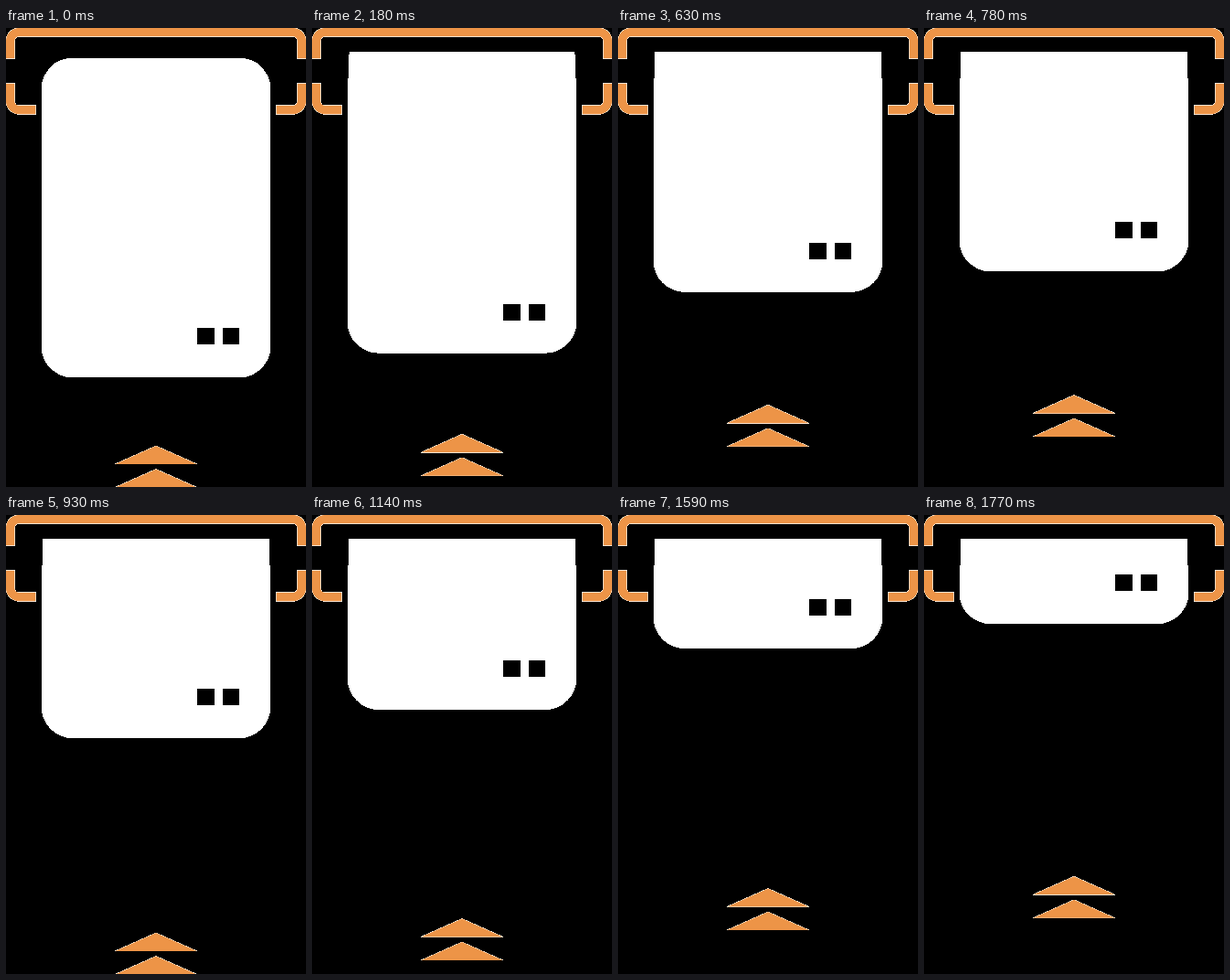
Write an HTML page with a canvas that moves like this. It is 328x502 px and loops after 1800 ms.

```html
<!DOCTYPE html>
<html lang="en">
<head>
<meta charset="utf-8">
<title>Card insert</title>
<style>
html, body { margin: 0; width: 100%; height: 100%; overflow: hidden; background: #000; }
canvas { display: block; }
</style>
</head>
<body>
<canvas id="stage" width="328" height="502"></canvas>
<script>
const ctx = document.getElementById('stage').getContext('2d', { willReadFrequently: true });
const W = 328, H = 502, LOOP = 1800, STEP = 30;
const ORANGE = '#ed9447';
const SLOT_Y = 26;

function drawSlot() {
  const c = 4.65, r = 9.5, top = 33.3, low = 60.7, end = 32.4, base = 89.5;
  ctx.beginPath();
  ctx.moveTo(c, top);
  ctx.arcTo(c, c, W / 2, c, r);
  ctx.arcTo(W - c, c, W - c, top, r);
  ctx.lineTo(W - c, top);
  for (const side of [x => x, x => W - x]) {
    ctx.moveTo(side(c), low);
    ctx.arcTo(side(c), base, side(end), base, r);
    ctx.lineTo(side(end), base);
  }
  ctx.strokeStyle = ORANGE;
  ctx.lineWidth = 9.4;
  ctx.stroke();
}

function drawCard(shift) {
  ctx.save();
  ctx.beginPath();
  ctx.rect(40, SLOT_Y, 248, 29);
  ctx.rect(0, 55, W, H - 55);
  ctx.clip();
  ctx.fillStyle = '#fff';
  ctx.beginPath();
  ctx.roundRect(39, 33 - shift, 250, 349, 34);
  ctx.fill();
  ctx.globalCompositeOperation = 'destination-out';
  ctx.fillRect(209, 328 - shift, 19, 18.8);
  ctx.fillRect(236.6, 328 - shift, 18.8, 18.8);
  ctx.restore();
}

function drawChevron(y) {
  ctx.beginPath();
  ctx.moveTo(164, y);
  ctx.lineTo(209, y + 20);
  ctx.lineTo(119, y + 20);
  ctx.fillStyle = ORANGE;
  ctx.fill();
}

// Soft edge pixels blend with white; everything empty becomes black.
function matte() {
  const img = ctx.getImageData(0, 0, W, H), d = img.data;
  for (let i = 0; i < d.length; i += 4) {
    const a = d[i + 3] / 255, solid = a > 0.08;
    for (let k = i; k < i + 3; k++) {
      d[k] = solid ? d[k] * a + 255 * (1 - a) : 0;
    }
    d[i + 3] = 255;
  }
  ctx.putImageData(img, 0, 0);
}

// Two upward runs per loop, with a jump back between them.
function chevronTop(t) {
  const run = t < 930 ? t / 900 : (t - 930) / 870;
  return 457 - 64 * run;
}

function draw(t) {
  ctx.clearRect(0, 0, W, H);
  drawCard(267.5 * t / LOOP);
  drawSlot();
  const y = chevronTop(t);
  drawChevron(y);
  drawChevron(y + 25.5);
  matte();
}

let start = null;
function tick(now) {
  if (start === null) start = now;
  const t = Math.max(0, now - start) % LOOP;
  draw(Math.floor(t / STEP + 1e-6) * STEP);
  requestAnimationFrame(tick);
}
draw(0);
requestAnimationFrame(tick);
</script>
</body>
</html>
```
